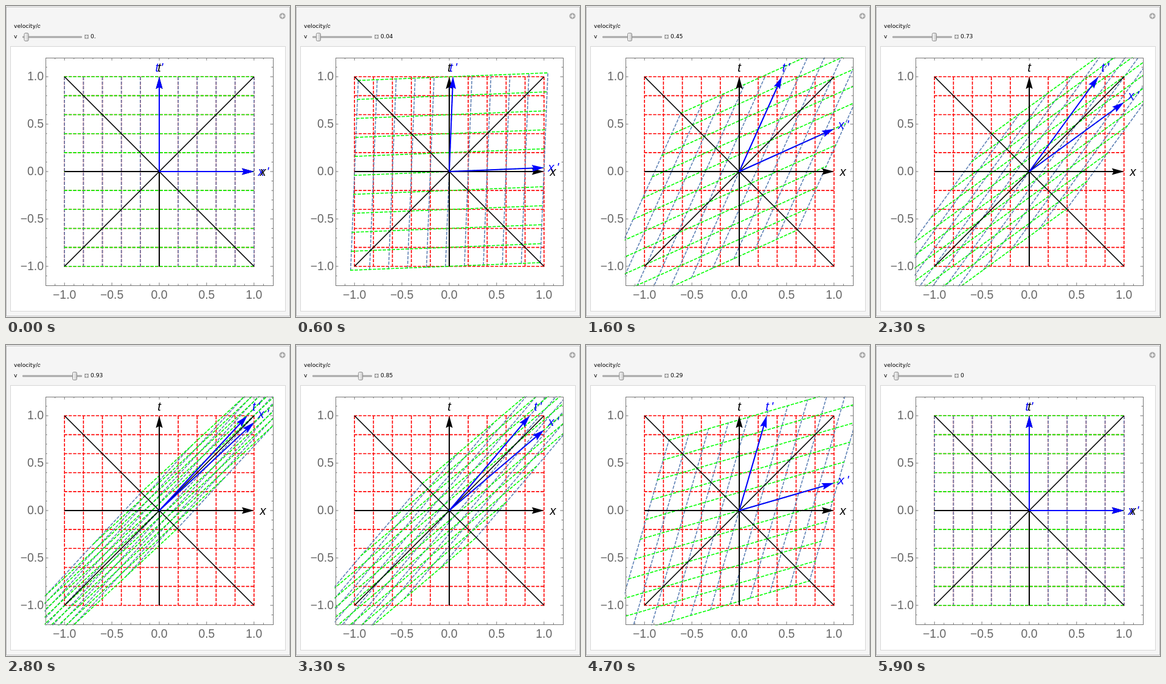
An HTML page for the animation above (6 s loop, 467 by 511 pixels).

```html
<!DOCTYPE html>
<html lang="en">
<head>
<meta charset="utf-8">
<title>Lorentz transformation</title>
<style>
  html, body { margin: 0; width: 100%; height: 100%; overflow: hidden; background: #fff; }
  svg { display: block; width: 467px; height: 511px; }
  text { font-family: "Liberation Sans", Arial, sans-serif; }
  .ui { font-family: "DejaVu Sans", sans-serif; font-size: 9.2px; }
  .tick { font-size: 19.4px; fill: #666; }
  .name { font-size: 20px; font-style: italic; }
  .grid { fill: none; stroke-width: 1.6; stroke-dasharray: 3.74 3.74; stroke-linecap: square; }
</style>
</head>
<body>
<svg id="stage" viewBox="0 0 467 511">
  <defs>
    <clipPath id="plot"><rect x="63.5" y="84.5" width="376.5" height="376"/></clipPath>
    <linearGradient id="knob"><stop stop-color="#fafafa"/><stop offset="1" stop-color="#c8c8c8"/></linearGradient>
  </defs>
  <rect x=".5" y="1.5" width="466" height="508" fill="#f5f5f5" stroke="#bbb"/>
  <rect x="7.5" y="66.5" width="452" height="435" fill="#fff" stroke="#d6d6d6"/>
  <circle cx="454.5" cy="16.5" r="5" fill="#aaa"/>
  <path d="M451.5 16.5h6M454.5 13.5v6" stroke="#fff" stroke-width="1.4"/>
  <text class="ui" x="13" y="36">velocity/<tspan font-family="Liberation Sans, sans-serif" font-style="italic">c</tspan></text>
  <text class="ui" x="13" y="53">v</text>
  <rect x="27" y="49.5" width="98" height="3" rx="1" fill="#a8a8a8"/>
  <rect id="thumb" y="44.5" width="7" height="13" rx="2" fill="url(#knob)" stroke="#8c8c8c"/>
  <rect x="129" y="47" width="7" height="7" rx="1" fill="#aaa"/>
  <path d="M130 50.5h5M132.5 48v5" stroke="#fff"/>
  <text id="value" class="ui" x="139" y="53"></text>
</svg>
<script>
const CX = 252, CY = 272, UNIT = 155.8, HALF = 187;
const stage = document.getElementById('stage');
const thumb = document.getElementById('thumb');
const value = document.getElementById('value');

function add(tag, attrs, parent = stage, content = '') {
  const node = document.createElementNS('http://www.w3.org/2000/svg', tag);
  for (const key in attrs) node.setAttribute(key, attrs[key]);
  node.textContent = content;
  parent.append(node);
  return node;
}
const px = x => CX + UNIT * x;
const py = t => CY - UNIT * t;
const segment = (x1, t1, x2, t2) =>
  `M${px(x1).toFixed(2)} ${py(t1).toFixed(2)}L${px(x2).toFixed(2)} ${py(t2).toFixed(2)}`;

// Grids: eleven lines per direction
const levels = Array.from({ length: 11 }, (_, i) => (i - 5) / 5);
const clipped = add('g', { 'clip-path': 'url(#plot)' });
const grid = color => add('path', { class: 'grid', stroke: color }, clipped);
const restGrid = grid('#f00'), xGrid = grid('#5e81b5'), tGrid = grid('#0f0');
restGrid.setAttribute('d',
  levels.map(c => segment(c, -1, c, 1) + segment(-1, c, 1, c)).join(''));

// Light cone and rest axes
add('path', { d: segment(-1, -1, 1, 1) + segment(-1, 1, 1, -1), stroke: '#000', 'stroke-width': 1.6 });

function arrow(color) {
  const group = add('g', { fill: color, stroke: color });
  const shaft = add('path', { 'stroke-width': 2 }, group);
  const head = add('path', { d: 'M0 0L-20 -5.6L-17 0L-20 5.6Z', stroke: 'none' }, group);
  return (x1, t1, x2, t2) => {
    const angle = Math.atan2(t1 - t2, x2 - x1);
    const tipX = px(x2), tipY = py(t2);
    const endX = tipX - 14 * Math.cos(angle), endY = tipY - 14 * Math.sin(angle);
    shaft.setAttribute('d', `M${px(x1)} ${py(t1)}L${endX} ${endY}`);
    head.setAttribute('transform', `translate(${tipX} ${tipY}) rotate(${angle * 180 / Math.PI})`);
  };
}
arrow('#000')(-1, 0, 1, 0);
arrow('#000')(0, -1, 0, 1);
const xArrow = arrow('#00f'), tArrow = arrow('#00f');

// Frame with ticks on all sides
add('rect', { x: CX - HALF + .5, y: CY - HALF + .5, width: 374, height: 374, fill: 'none', stroke: '#777' });
let ticks = '';
for (let i = -11; i <= 11; i++) {
  const size = i % 5 ? 2.5 : 4.5, x = px(i / 10), y = py(i / 10);
  ticks += `M${x} ${CY - HALF}v${size}M${x} ${CY + HALF}v${-size}` +
           `M${CX - HALF} ${y}h${size}M${CX + HALF} ${y}h${-size}`;
}
add('path', { d: ticks, stroke: '#777' });
for (const c of [-1, -.5, 0, .5, 1]) {
  const label = c.toFixed(1).replace('-', '−');
  add('text', { class: 'tick', x: px(c), y: 481, 'text-anchor': 'middle' }, stage, label);
  add('text', { class: 'tick', x: 62, y: py(c) + 6, 'text-anchor': 'end' }, stage, label);
}

function primed(letter, width) {
  const group = add('g', { class: 'name', fill: '#00f' });
  add('text', { x: -width / 2, y: 7 }, group, letter);
  add('text', { x: width / 2 - 4, y: 7 }, group, "'");
  return (x, t) => group.setAttribute('transform', `translate(${px(x)} ${py(t)})`);
}
const xName = primed('x', 18), tName = primed('t', 13);
add('text', { class: 'name', x: 422.5, y: 279, 'text-anchor': 'middle' }, stage, 'x');
add('text', { class: 'name', x: 252, y: 108, 'text-anchor': 'middle' }, stage, 't');

// A small twitch first, then a steady climb and return
const opening = [0, .01, .02, .02, .01];
function velocity(step) {
  if (step < opening.length) return opening[step];
  const count = Math.min(step - 5, 54 - step);
  return count > 0 ? Math.round(100 * (.004 + .0403 * count)) / 100 : 0;
}

function draw(step) {
  const v = velocity(step), gamma = 1 / Math.sqrt(1 - v * v);
  const boosted = (x1, t1, x2, t2) => segment(
    gamma * (x1 + v * t1), gamma * (t1 + v * x1),
    gamma * (x2 + v * t2), gamma * (t2 + v * x2));
  xGrid.setAttribute('d', levels.map(c => boosted(c, -1, c, 1)).join(''));
  tGrid.setAttribute('d', levels.map(c => boosted(-1, c, 1, c)).join(''));
  xArrow(0, 0, 1, v);
  tArrow(0, 0, v, 1);
  xName(1.1, 1.1 * v);
  tName(1.1 * v, 1.1);
  thumb.setAttribute('x', 30 + 85.5 * v);
  value.textContent = v ? String(v) : step === 59 ? '0' : '0.';
}

let shown = -1;
function tick() {
  const step = Math.floor(performance.now() % 6000 / 100);
  if (step !== shown) draw(shown = step);
  requestAnimationFrame(tick);
}
tick();
</script>
</body>
</html>
```
